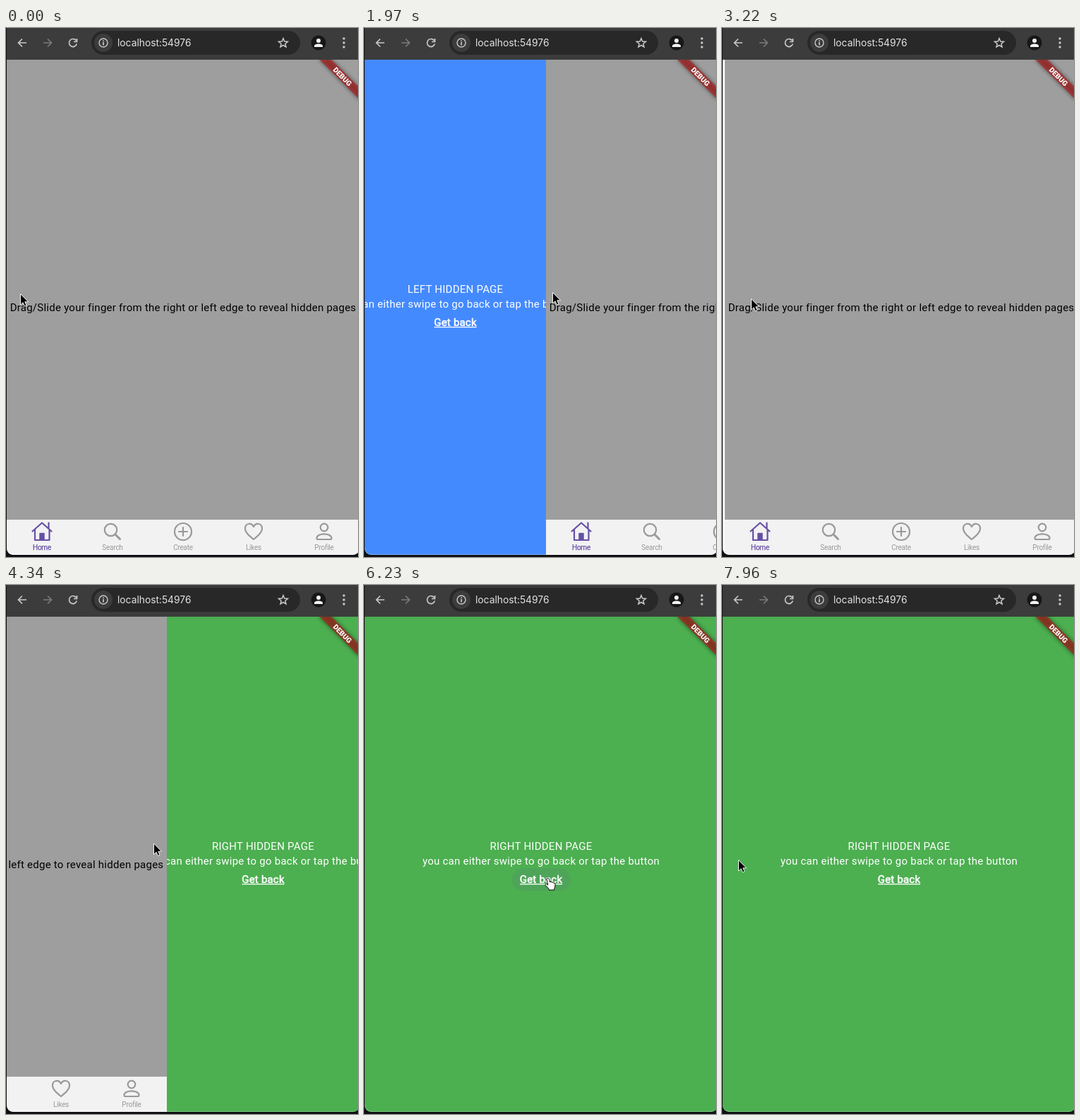
Recreate the animation shown at these times as an HTML page. Size 499 by 751 pixels, loop 7.99 s.

```html
<!DOCTYPE html>
<html lang="en">
<head>
<meta charset="utf-8">
<style>
  html, body { margin: 0; width: 100%; height: 100%; overflow: hidden; background: #101012; }
  svg { display: block; }
  svg svg { overflow: hidden; }
  text { font: 15px Roboto, sans-serif; letter-spacing: .25px; }
  .page text, .page .rule { fill: #fff; text-anchor: middle; }
  .page .link { stroke: #fff; stroke-width: .6px; letter-spacing: .2px; }
  .tabs text { font-size: 10px; letter-spacing: -.24px; text-anchor: middle; fill: #999; }
  .tabs .on { fill: #6750a4; stroke: #6750a4; stroke-width: .25px; }
  .line { fill: none; stroke: #999; stroke-width: 2.2; stroke-linecap: round; stroke-linejoin: round; }
  .bar { fill: none; stroke: #c9c9c9; stroke-width: 1.7; }
</style>
</head>
<body>
<svg width="499" height="751" viewBox="0 0 499 751">
  <defs>
    <clipPath id="window"><rect x="1" y="25" width="500" height="723" rx="9"/></clipPath>
    <clipPath id="view"><rect x="1" y="45" width="500" height="703"/></clipPath>
    <filter id="blur" x="-30%" y="-100%" width="160%" height="300%"><feGaussianBlur stdDeviation="3"/></filter>
  </defs>

  <rect x="1" width="498" height="45" fill="#3c3c3c"/>
  <rect x="121" y="4" width="296" height="34" rx="17" fill="#282828"/>
  <circle cx="138" cy="21" r="13" fill="#3c3c3c"/>
  <g class="bar">
    <path d="M29 21H18M23 15.500L17.500 21L23 26.500"/>
    <path d="M53 21H64M59 15.500L64.500 21L59 26.500" stroke="#7b7b7b"/>
    <path d="M99.600 18A5.500 5.500 0 1 0 100.300 22.500M100.500 15V19.500H96"/>
    <circle cx="138" cy="21" r="6" stroke-width="1.400"/>
    <path d="M138 20V24.500M138 17.500V19"/>
    <path id="star" stroke-width="1.500"/>
  </g>
  <text x="158" y="26" fill="#e3e3e3" style="font:13.8px Inter,sans-serif;letter-spacing:0">localhost:54976</text>
  <circle cx="443" cy="21" r="10.500" fill="#171717"/>
  <path d="M437 27V25.500C437 21.500 449 21.500 449 25.500V27Z" fill="#f2f2f2"/>
  <circle cx="443" cy="18" r="3" fill="#f2f2f2"/>
  <g fill="#c9c9c9"><circle cx="479" cy="15" r="1.700"/><circle cx="479" cy="21" r="1.700"/><circle cx="479" cy="27" r="1.700"/></g>

  <g clip-path="url(#window)"><g clip-path="url(#view)">
    <svg id="left" class="page" x="1" height="751">
      <rect id="leftFill" width="100%" height="751"/>
      <g id="leftText">
        <text x="50%" y="376">LEFT HIDDEN PAGE</text>
        <text x="50%" y="397">you can either swipe to go back or tap the button</text>
        <text x="50%" y="423" class="link">Get back</text>
        <rect class="rule" x="50%" y="424" width="60" height="1.300" transform="translate(-30)"/>
      </g>
    </svg>
    <svg id="right" class="page" height="751">
      <rect width="100%" height="751" fill="#4caf50"/>
      <rect id="hover" x="209" y="402" width="83" height="32" rx="16" fill="#6750a4" fill-opacity=".1"/>
      <text x="50%" y="376">RIGHT HIDDEN PAGE</text>
      <text x="50%" y="397">you can either swipe to go back or tap the button</text>
      <text x="50%" y="423" class="link">Get back</text>
      <rect class="rule" x="50%" y="424" width="60" height="1.300" transform="translate(-30)"/>
    </svg>
    <g id="main">
      <rect x="1" y="45" width="500" height="653" fill="#9e9e9e"/>
      <text x="251" y="402" text-anchor="middle">Drag/Slide your finger from the right or left edge to reveal hidden pages</text>
      <g class="tabs">
        <rect x="1" y="698" width="500" height="50" fill="#f2f2f2"/>
        <g class="line">
          <g style="stroke:#6750a4">
            <path d="M37.500 714.500L51 702.500L64.500 714.500M60.500 710V702.500M41 712.500V727H61.500V712.500"/>
            <path d="M48 717.500H54V726H48Z" fill="#6750a4" stroke-width="1.500"/>
          </g>
          <circle cx="148.500" cy="712.500" r="8.700"/><path d="M155 719L161.500 725.500" stroke-width="3"/>
          <circle cx="251" cy="715" r="12"/><path d="M245 715H257M251 709V721"/>
          <path d="M351 726C345 721 339 716 339 710.500C339 703 348 701.500 351 708C354 701.500 363 703 363 710.500C363 716 357 721 351 726Z"/>
          <circle cx="451" cy="709" r="5.300"/>
          <path d="M440.500 724C441 716.500 461 716.500 461.500 724Q461.500 726 460 726H442Q440.500 726 440.500 724Z"/>
        </g>
        <text x="51" y="741" class="on">Home</text>
        <text x="151" y="741">Search</text>
        <text x="251" y="741">Create</text>
        <text x="351" y="741">Likes</text>
        <text x="451" y="741">Profile</text>
      </g>
    </g>
    <g transform="translate(501 45) rotate(45)">
      <rect x="-40" y="28" width="80" height="12" fill="#000" fill-opacity=".5" filter="url(#blur)"/>
      <rect x="-40" y="28" width="80" height="12" fill="#b71c1c" fill-opacity=".63"/>
      <text y="37.600" text-anchor="middle" fill="#fff" style="font-size:10.2px;font-weight:900;letter-spacing:0">DEBUG</text>
    </g>
  </g></g>
  <path d="M1.500 738Q1.500 747.500 11 747.500H491Q498 747.500 500 743" fill="none" stroke="#fff" stroke-opacity=".28"/>

  <g id="cursor" stroke-linejoin="round">
    <path id="arrow" transform="translate(-.5 -.5) scale(.94)" d="M0 0V16.500L3.800 13L6.200 18.500L9 17.300L6.700 12H11.800Z" stroke="#fff"/>
    <path id="hand" d="M0 1.500C0 -.5 3 -.5 3.300 1.500L4.500 6C5 4.500 7 5 7.200 6.300C8 5.300 9.500 6 9.700 7.200C11 6.500 12 7.500 12 9C12.300 12 11 13.500 10.500 17H3.500C3 14.500 .5 12.500 -2 10.500C-3 9 -1 7.500 1.800 10Z" fill="#fff" stroke="#000"/>
  </g>
</svg>
<script>
const LOOP = 7990, WIDTH = 500;
const $ = id => document.getElementById(id);

const pull = u => u ** 1.85;
const smooth = u => u * u * (3 - 2 * u);
const settle = u => 1 - (1 - u) ** 4;

// Eased step from 0 to 1 between two times
const step = (t, start, end, ease = smooth) => ease(Math.min(1, Math.max(0, (t - start) / (end - start))));

// Offset of the main page: positive shows the left page, negative the right one
function pageOffset(t) {
  if (t < 3500)
    return 327 * step(t, 750, 2140, pull) - 296 * step(t, 2310, 3050) - 31 * step(t, 3050, 3430, settle);
  if (t < 6900)
    return WIDTH * (step(t, 6380, 6800, settle) - step(t, 3750, 4570, pull))
      + 250 * Math.sin(Math.PI * step(t, 5050, 5820));
  return -WIDTH * step(t, 6970, 7740);
}

// The cursor holds its grip on the page while dragging and glides freely otherwise
function cursorAt(t, offset) {
  const glide = (start, end, [x0, y0], [x1, y1]) => {
    const u = step(t, start, end);
    return [x0 + (x1 - x0) * u, y0 + (y1 - y0) * u];
  };
  const button = [259, 416], outside = [515, 425];
  if (t < 750) {
    const swing = Math.sin(Math.PI * step(t, 110, 570));
    return [21 - 10 * step(t, 110, 570) - 4 * swing, 378 - 2 * step(t, 110, 570) - 9 * swing];
  }
  if (t < 3050) return [offset + 11, 376 + 9 * step(t, 2310, 3050)];
  if (t < 3750) return glide(3230, 3600, [42, 385], [483, 378]);
  if (t < 5850) return [Math.max(3, 483 + offset), 378 - 13 * step(t, 3750, 4570)];
  if (t < 6380) return glide(5850, 6230, [3, 365], button);
  if (t < 6970) return glide(6400, 6760, button, outside);
  if (t < 7740) return [Math.max(40, WIDTH + offset), 393];
  return glide(7740, 7940, [40, 393], [24, 391]);
}

const star = Array.from({ length: 10 }, (_, i) => {
  const r = i % 2 ? 3 : 6.8, a = i * Math.PI / 5;
  return `${393 + r * Math.sin(a)} ${21.5 - r * Math.cos(a)}`;
});
$('star').setAttribute('d', `M${star.join('L')}Z`);

const show = (id, on) => $(id).setAttribute('visibility', on ? 'visible' : 'hidden');

function draw() {
  const t = performance.now() % LOOP;
  const offset = Math.round(pageOffset(t));
  const released = t > 3050;
  const hovering = t > 6080 && t < 6430;

  $('main').setAttribute('transform', `translate(${offset})`);
  $('left').setAttribute('width', Math.max(0, offset));
  $('leftFill').setAttribute('fill', released ? '#fff' : '#448aff');
  show('leftText', !released);
  $('right').setAttribute('x', 1 + WIDTH + Math.min(0, offset));
  $('right').setAttribute('width', Math.max(0, -offset));

  $('cursor').setAttribute('transform', `translate(${cursorAt(t, offset)})`);
  show('arrow', !hovering);
  show('hand', hovering);
  show('hover', hovering);
  requestAnimationFrame(draw);
}
draw();
</script>
</body>
</html>
```
